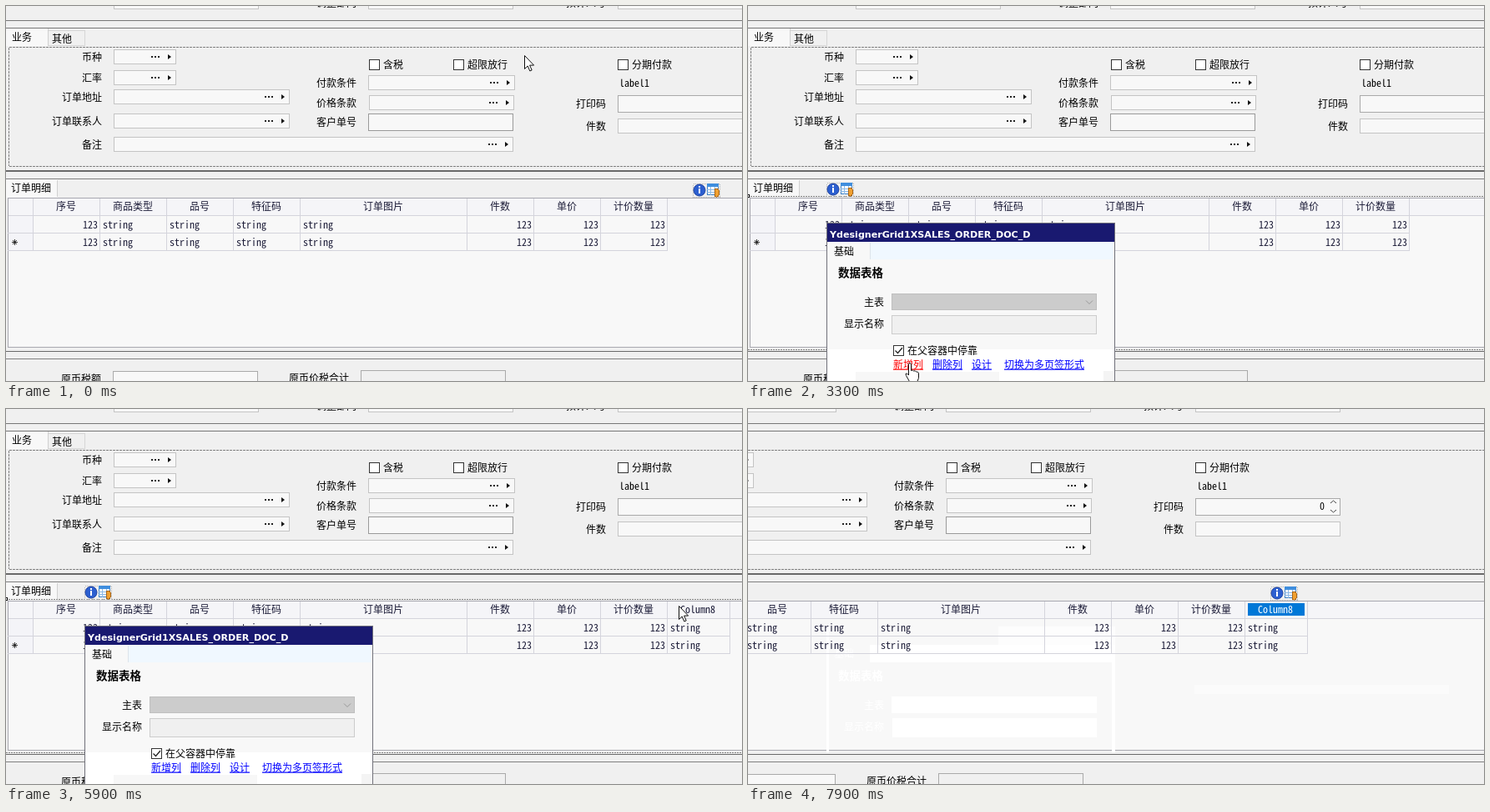
Write an HTML page that moves like this. It is 882 px wide and 450 px high and loops after 8 s.

```html
<!DOCTYPE html>
<html lang="zh-CN">
<head>
<meta charset="utf-8">
<title>Form designer</title>
<style>
html, body { margin: 0; width: 100%; height: 100%; overflow: hidden; background: #f0f0f0; }
svg { display: block; width: 882px; height: 450px; }
rect, line, .crisp { shape-rendering: crispEdges; }
text { font: 12px "Noto Sans CJK SC", "Noto Sans CJK", sans-serif; fill: #000; }
.m { font-family: "Noto Sans Mono CJK SC", "Noto Sans CJK SC", monospace; }
.mid { text-anchor: middle; }
.end { text-anchor: end; }
.cell { fill: #1c1c38; }
.head { font: bold 11.1px "DejaVu Sans", sans-serif; fill: #fff; }
.head .m { font: inherit; }
.bold { font-size: 13.5px; font-weight: 700; }
.link { fill: #00f; text-decoration: underline; }
.white, .white text { fill: #fff; }

.a { animation: 8s step-end -20ms infinite; }
#scroll { animation-name: scroll; }
#cursor { animation-name: move; }
#arrow { animation-name: arrow; }
#hand { animation-name: hand; }
#icons { animation-name: icons; }
#chosen { animation-name: chosen; }
#hover { animation-name: hover; }
#popup { animation-name: popup; }
#add { animation-name: add; }
#dialog { animation-name: dialog; transform-origin: 690.5px 121px; filter: drop-shadow(0 3px 7px #0005); }
#column { animation-name: column; }
#picked, #trace { animation-name: picked; }

@keyframes scroll {
  0% { transform: none; }
  91.25% { transform: translateX(0); animation-timing-function: steps(6); }
  98.75%, 100% { transform: translateX(-197px); }
}
@keyframes move {
  0% { transform: translate(621px, 59px); animation-timing-function: steps(6); }
  7.5% { transform: translate(1px, 316px); }
  13.75% { transform: translate(1px, 316px); animation-timing-function: steps(9); }
  25% { transform: translate(100px, 217px); }
  31.25% { transform: translate(100px, 217px); animation-timing-function: steps(6); }
  38.75% { transform: translate(194px, 429px); }
  42.5% { transform: translate(194px, 429px); animation-timing-function: steps(6); }
  50% { transform: translate(800px, 106px); animation-timing-function: steps(3); }
  53.75% { transform: translate(678px, 302px); }
  63.75% { transform: translate(678px, 302px); animation-timing-function: steps(4); }
  68.75% { transform: translate(855px, 252px); }
  71.25% { transform: translate(866px, 252px); animation-timing-function: steps(2); }
  73.75% { transform: translate(806px, 236px); }
  78.75% { transform: translate(806px, 236px); animation-timing-function: steps(5); }
  85%, 100% { transform: translate(890px, 413px); }
}
@keyframes arrow { 0%, 43.75% { opacity: 1; } 38.75% { opacity: 0; } }
@keyframes hand { 0%, 43.75% { opacity: 0; } 38.75% { opacity: 1; } }
@keyframes icons { 0%, 80% { opacity: 1; } 12.5% { opacity: 0; } }
@keyframes chosen { 0%, 80% { opacity: 0; } 15% { opacity: 1; } }
@keyframes hover { 0%, 32.5% { opacity: 0; } 25% { opacity: .4; } }
@keyframes popup { 0%, 77.5% { opacity: 0; } 28.75% { opacity: 1; } }
@keyframes add { 0%, 43.75% { fill: #00f; } 41.25% { fill: #f00; } }
@keyframes column { 0% { opacity: 0; } 62.5%, 100% { opacity: 1; } }
@keyframes picked { 0% { opacity: 0; } 77.5%, 100% { opacity: 1; } }
@keyframes dialog {
  0%, 65% { opacity: 0; transform: scale(.95); }
  43.75% { opacity: .4; transform: scale(.95); }
  45% { opacity: .8; transform: scale(.985); }
  46.25% { opacity: 1; transform: none; }
  61.25% { opacity: .8; transform: scale(.985); }
  62.5% { opacity: .45; transform: scale(.97); }
  63.75% { opacity: .15; transform: scale(.961); }
}
</style>
</head>
<body>
<svg id="stage" viewBox="0 0 882 450"></svg>
<script>
// Boxes take their outer edges, text takes its vertical centre.
const fill = (x, y, x2, y2, c) =>
  `<rect x="${x}" y="${y}" width="${x2 - x}" height="${y2 - y}" fill="${c}"/>`;
const box = (x, y, x2, y2, c = '#f8f8f8', s = '#c4c4c4') =>
  fill(x, y, x2, y2, s) + fill(x + 1, y + 1, x2 - 1, y2 - 1, c);
const text = (x, y, s, cls = '', id = '') =>
  `<text x="${x}" y="${y + 4.5}" class="${cls}"${id && ` id="${id}"`}>` +
  s.replace(/[ -~]+/g, '<tspan class="m">$&</tspan>') + '</text>';
const path = (d, s, w = 1, f = 'none', more = '') =>
  `<path d="${d}" fill="${f}" stroke="${s}" stroke-width="${w}" ${more}/>`;
const dashes = (d, pattern = '3 1', c = '#808080') =>
  path(d, c, 1, 'none', `class="crisp" stroke-dasharray="${pattern}"`);
const group = (id, ...parts) => `<g id="${id}" class="a">${parts.join('')}</g>`;
const label = (x, y, s) => text(x, y, s, 'end');
const check = (x, y, s) => box(x, y, x + 13, y + 13, '#fff', '#333') + text(x + 17, y + 6, s);

// Lookup field with three dots and an arrow at its right end
const lookup = (x, y, r) => box(x, y, r, y + 18) +
  [30, 26, 22].map(d => fill(r - d, y + 8, r - d + 2, y + 10, '#222')).join('') +
  path(`M${r - 10} ${y + 6}l4 3-4 3z`, 'none', 0, '#111');

const tools = (x, y) => `<g transform="translate(${x} ${y})">` +
  dashes('M.5.5h32v16h-32z', '1 1', '#b0b0b0') +
  '<circle cx="8" cy="8" r="7" fill="#2c5fd0" stroke="#1c3f9c"/>' +
  fill(7, 3, 9, 5, '#fff') + fill(7, 6, 9, 12, '#fff') +
  box(17, 0, 31, 14, '#fff', '#3b7fc4') + fill(17, 0, 31, 4, '#3f8ede') +
  path('M17 7.5h14M17 10.5h14M21.5 4v10M26.5 4v10', '#8ab8e6', 1, 'none', 'class="crisp"') +
  '<rect x="26" y="6" width="5" height="10" rx="2" fill="#f0a030" stroke="#a8661a"/></g>';

const backdrop = [
  fill(0, 17, 882, 18, '#777'), fill(0, 26, 882, 27, '#777'),
  dashes('M0 49.5H882M0 192.5H882'),
  fill(0, 197, 882, 199, '#696969'), fill(0, 207, 882, 208, '#808080'),
  fill(0, 230, 882, 410, '#a8a8b0'), fill(0, 231, 882, 409, '#f8f8f8'),
  fill(0, 231, 882, 251, '#f5f5f8'), fill(0, 251, 882, 252, '#d4d4dc'),
  fill(0, 414, 882, 415, '#696969'), fill(0, 423, 882, 424, '#808080')
].join('');

// Pale trace that the closed windows leave behind
const trace = group('trace', '<g class="white">',
  fill(94, 261, 97, 412, '#fff'), fill(436, 261, 440, 412, '#fff'),
  fill(300, 261, 440, 283, '#fdfdfd'), fill(146, 283, 440, 304, '#fff'),
  text(103, 293, '基础'), text(108, 320, '数据表格', 'bold'),
  label(163, 355, '主表'), label(163, 381, '显示名称'),
  fill(172, 345, 418, 365, '#fff'), fill(173, 371, 418, 394, '#fff'),
  fill(535, 331, 840, 342, '#fbfbfb'), '</g>');

const form = [
  box(129, -15, 303, 4), label(420, -4, '调整部门'), box(434, -15, 608, 4),
  label(719, -4, '预计人号'), box(733, -15, 907, 4),
  fill(0, 48, 3, 194, '#f0f0f0'), dashes('M3.5 50V192'),
  box(50, 29, 95, 48, '#f0f0f0', '#d6d6d6'),
  fill(0, 27, 50, 48, '#f8f8f8'), fill(50, 27, 51, 48, '#d0d0d0'),
  text(7, 37, '业务'), text(55, 39, '其他'),
  label(115, 61, '币种'), lookup(129, 52, 204),
  label(115, 86, '汇率'), lookup(129, 77, 204),
  label(115, 109, '订单地址'), lookup(129, 100, 340),
  label(115, 138, '订单联系人'), lookup(129, 129, 340),
  label(115, 166, '备注'), lookup(129, 157, 608),
  check(435, 64, '含税'), check(536, 64, '超限放行'), check(733, 64, '分期付款'),
  label(420, 92, '付款条件'), lookup(434, 83, 610),
  label(420, 116, '价格条款'), lookup(435, 107, 609),
  label(420, 139, '客户单号'), box(434, 129, 608, 150, '#f8f8f8', '#9a9a9a'),
  text(735, 92, 'label1'),
  label(719, 117, '打印码'), box(733, 107, 907, 128, '#f8f8f8', '#aaa'),
  text(882, 116, '0'), path('M895 113l3.5-3 3.5 3M895 121l3.5 3 3.5-3', '#444'),
  label(719, 144, '件数'), box(733, 135, 907, 153),
  label(114, 447, '原币税额'), box(128, 438, 302, 460, '#f8f8f8', '#aaa'),
  label(411, 446, '原币价税合计'), box(425, 437, 599, 460, '#f0f0f0', '#aaa')
].join('');

const rows = [262, 283];
const rule = '#d4d4dc';
const heads = ['序号', '商品类型', '品号', '特征码', '订单图片', '件数', '单价', '计价数量'];
const edges = [32, 112, 192, 272, 352, 552, 632, 712, 792];
const cells = heads.map((h, i) => {
  const [l, r] = [edges[i], edges[i + 1]];
  const value = y => i > 0 && i < 5 ? text(l + 4, y, 'string', 'cell') : text(r - 2, y, '123', 'cell end');
  return text((l + r) / 2, 240, h, 'cell mid') + rows.map(value).join('');
}).join('');

const grid = [
  fill(0, 230, 2, 410, '#f0f0f0'), fill(2, 230, 3, 410, '#a8a8b0'),
  fill(3, 252, 32, 293, '#f4f4f8'),
  fill(2, 272, 792, 273, rule), fill(2, 293, 792, 294, rule),
  edges.map(x => fill(x, 231, x + 1, 294, rule)).join(''), cells,
  path('M7 283.5h7M10.5 280v7M8 281l5 5M13 281l-5 5', '#333'),
  fill(0, 208, 62, 230, '#f8f8f8'), fill(61, 209, 62, 229, '#d0d0d0'),
  text(6, 218, '订单明细'),
  group('column',
    fill(792, 272, 868, 273, rule), fill(792, 293, 868, 294, rule), fill(867, 231, 868, 294, rule),
    text(829, 240, 'Column8', 'cell mid'), rows.map(y => text(796, y, 'string', 'cell')).join('')),
  group('picked', fill(796, 233, 864, 248, '#0078d7'), text(829, 240, 'Column8', 'white mid')),
  group('icons', tools(823, 213))
].join('');

const chosen = group('chosen',
  dashes('M0 228.5H882M0 412.5H882', '2 1'), box(-2, 226, 2, 230, '#fff', '#000'),
  tools(94, 212),
  '<circle id="hover" class="a" cx="102" cy="220" r="7.5" fill="#444"/>');

const popup = group('popup',
  fill(94, 260, 440, 450, '#70707a'), fill(95, 283, 439, 412, '#f8f8f8'),
  fill(95, 412, 439, 450, '#fff'),
  fill(129, 439, 301, 450, '#f7f7f7'), fill(426, 438, 439, 450, '#f4f4f4'),
  fill(95, 261, 439, 283, '#191970'),
  text(98, 273, 'YdesignerGrid1XSALES_ORDER_DOC_D', 'head'),
  fill(147, 283, 438, 304, '#f0f8ff'), fill(146, 284, 147, 304, '#dde4ea'),
  text(103, 294, '基础'), text(108, 320, '数据表格', 'bold'),
  label(163, 355, '主表'), box(172, 345, 418, 365, '#ccc', '#bfbfbf'),
  path('M405 353.5l4 4 4-4', '#999'),
  label(163, 381, '显示名称'), box(172, 371, 418, 394, '#f0f0f0', '#ccc'),
  check(174, 407, '在父容器中停靠'), path('M176.5 413.5l3 3 5.5-6.5', '#222', 1.3),
  text(174, 430, '新增列', 'link a', 'add'), text(221, 430, '删除列', 'link'),
  text(268, 430, '设计', 'link'), text(307, 430, '切换为多页签形式', 'link'));

const kinds = ['文本', '掩码文本', '数值', '复选框', '日期', '开窗', '多来源开窗', 'Picklist'];
const dialog = group('dialog',
  box(546, -87, 835, 330, '#f0f0f0', '#1883d7'),
  box(559, 20, 822, 287, '#f0f0f0', '#dcdcdc'),
  fill(565, 18, 689, 23, '#f0f0f0'), text(567, 19, '请选择列的编辑器类型'),
  kinds.map((k, i) => `<circle cx="622.5" cy="${54.5 + 31 * i}" r="6" fill="#fff" stroke="#333"/>` +
    text(633, 54 + 31 * i, k + '编辑器')).join(''),
  '<circle cx="622.5" cy="54.5" r="3" fill="#222"/>',
  fill(647, 295, 731, 316, '#0078d7'), fill(649, 297, 729, 314, '#e1e1e1'),
  text(689, 304, '确定(O)', 'mid'),
  box(739, 295, 821, 316, '#e1e1e1', '#adadad'), text(780, 304, '取消(C)', 'mid'));

const cursor = group('cursor',
  group('arrow', path('M.5.5v16l3.7-3.5 2.6 6 2.4-1-2.6-5.9h5z', '#111', 1, '#fff')),
  group('hand', path('M-1.5.5q1.5-2 3 0v8q2-1.5 3 .5 2-1 3 1 2.5-.5 3 1.5v6l-2 5H0l-4.5-8q-1.5-3 1-2.5l2 2z',
    '#111', 1, '#fff')));

document.getElementById('stage').innerHTML =
  backdrop + trace + group('scroll', form, grid) + chosen + popup + dialog + cursor;
</script>
</body>
</html>
```
